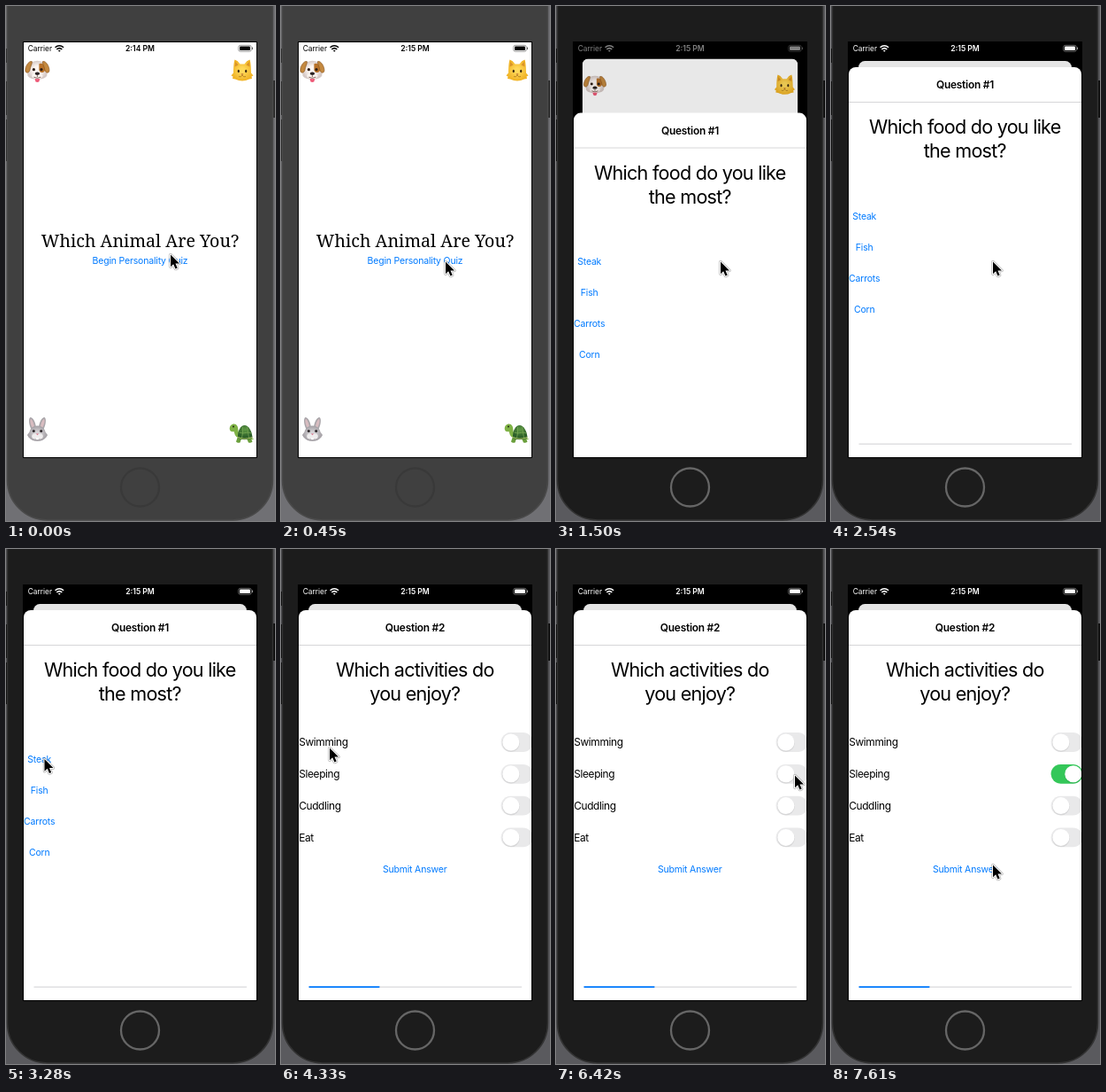
Write an HTML page that moves like this. It is 304x581 px and loops after 8 s.

```html
<!DOCTYPE html>
<html lang="en">
<head>
<meta charset="utf-8">
<title>Personality quiz</title>
<style>
html, body { margin: 0; width: 100%; height: 100%; overflow: hidden; background: #555; }
svg { display: block; width: 304px; height: 581px; }
text { font-family: Inter, Roboto, sans-serif; font-optical-sizing: none; }
.mid { text-anchor: middle; }
.bar { font-size: 8.4px; }
.clock { font-size: 8.6px; font-weight: 600; }
.title { font: 19.7px "Noto Serif", serif; }
.link { font-size: 10.5px; letter-spacing: -.018em; fill: #007aff; }
.head { font-size: 11.9px; font-weight: 600; letter-spacing: -.02em; }
.ask { font-size: 21.6px; letter-spacing: -.035em; }
.row { font-size: 11.9px; letter-spacing: -.03em; }
</style>
</head>
<body>
<svg viewBox="0 0 304 581">
  <defs>
    <clipPath id="screenClip"><rect x="20" y="41" width="263" height="468"/></clipPath>
    <clipPath id="cardClip"><rect id="cardShape" x="20" y="41" width="263" height="468"/></clipPath>
    <radialGradient id="fur"><stop offset=".4" stop-color="#fdf6f2"/><stop offset="1" stop-color="#d5c9c6"/></radialGradient>
    <radialGradient id="gold"><stop offset=".2" stop-color="#ffd95a"/><stop offset="1" stop-color="#f0b224"/></radialGradient>
    <radialGradient id="ash"><stop offset=".2" stop-color="#d6d3d6"/><stop offset="1" stop-color="#a29ea3"/></radialGradient>
    <radialGradient id="shell" cy=".3"><stop offset="0" stop-color="#5f9a45"/><stop offset="1" stop-color="#2d6029"/></radialGradient>
  </defs>

  <g id="device">
    <rect id="outside" width="304" height="581"/>
    <path id="keys" d="M0 48h3v16H0zM0 85h3v38H0zM0 128h3v47H0zM301 84h3v42h-3z"/>
    <rect id="body" x="1.5" y="-80" width="300" height="660" rx="45" stroke-width="1.5"/>
    <circle id="home" cx="151.5" cy="543" r="21.5" fill="none" stroke-width="2.3"/>
  </g>
  <rect x="19" y="40" width="265" height="470"/>

  <g clip-path="url(#screenClip)">
    <g id="card"><g clip-path="url(#cardClip)">
      <rect x="20" y="41" width="263" height="468" fill="#fff"/>

      <g id="dog" transform="translate(35.4 73.2)">
        <path d="M-6-10Q0-13 6-10C10-6 9-1 11 3 12 7 7 9.500 0 9.500S-12 7-11 3C-9-1-10-6-6-10z" fill="url(#fur)"/>
        <path d="M2-8C6-10 9-6 9-2 8 3 3 3 2-1z" fill="#b8722a"/>
        <path d="M-6-10.500C-10-12-14-4-13.500 0-12.500 3.500-9 2-8.500-1-8-5-6-7-6-10.500zM6-10.500C10-12 14-4 13.500 0 12.500 3.500 9 2 8.500-1 8-5 6-7 6-10.500z" fill="#c4893f" stroke="#8c5722" stroke-width=".7"/>
        <path d="M-2.500 8h5v2.500a2.500 2.300 0 0 1-5 0z" fill="#ee5a78"/>
        <ellipse cy="5.500" rx="6" ry="3.600" fill="#fbf5f1"/>
        <circle cx="-4" cy="-1.500" r="1.600" fill="#2c1c14"/><circle cx="4.600" cy="-1.500" r="1.600" fill="#2c1c14"/>
        <ellipse cy="3" rx="2.700" ry="1.800" fill="#2a2222"/>
        <path d="M0 5v2M-4 7Q0 9.300 4 7" fill="none" stroke="#66463c" stroke-width=".8"/>
      </g>

      <g id="cat" transform="translate(267 72.500)">
        <path d="M-10 3C-10-3-9.500-9-8.500-12Q-5-11-2.500-7H2.500Q5-11 8.500-12C9.500-9 10-3 10 3L12.500 6 10.500 7 11 9.500 8 10Q0 14 -8 10L-11 9.500-10.500 7-12.500 6z" fill="url(#gold)"/>
        <path d="M-7.700-9.500-8.500-4-4.500-6zM7.700-9.500 8.500-4 4.500-6z" fill="#d9932a"/>
        <ellipse cx="-4.200" cy="1" rx="1.100" ry="1.700" fill="#372610"/><ellipse cx="4.200" cy="1" rx="1.100" ry="1.700" fill="#372610"/>
        <path d="M-1.500 4h3L0 5.600z" fill="#a8572c"/>
        <path d="M0 5.500q-1.500 3-4 1.500M0 5.500q1.500 3 4 1.500" fill="none" stroke="#a2701a" stroke-width=".7"/>
      </g>

      <g id="rabbit" transform="translate(35.500 477.500)">
        <path d="M-1.500-2C-2-8-5-13.500-8-13.500-10.500-12-9.500-5-7 0zM1.500-2C2-8 5-13.500 8-13.500 10.500-12 9.500-5 7 0z" fill="#aaa6aa"/>
        <path d="M-3.500-3C-4-7-6-11.500-7.500-11.500-9-10-7.500-5-6-2zM3.500-3C4-7 6-11.500 7.500-11.500 9-10 7.500-5 6-2z" fill="#d8bcc0"/>
        <path d="M0-4C5-4 8-1 9 3L11.500 6.500 10 9Q6 13.500 0 13.500T-10 9L-11.500 6.500-9 3C-8-1-5-4 0-4z" fill="url(#ash)"/>
        <ellipse cx="-2.800" cy="8" rx="3.500" ry="2.900" fill="#efedee"/><ellipse cx="2.800" cy="8" rx="3.500" ry="2.900" fill="#efedee"/>
        <circle cx="-4.200" cy="2" r="1.500" fill="#2f292c"/><circle cx="4.200" cy="2" r="1.500" fill="#2f292c"/>
        <path d="M-1.600 5h3.200L0 6.700z" fill="#d9748a"/>
        <path d="M-1.300 9.500h2.600v2.200h-2.600z" fill="#fff"/>
      </g>

      <g id="turtle" transform="translate(266.500 481)">
        <path d="M-4 6C-8 5-8 1-9-1-13 0-14.500-3-13.500-6-12-10-7-11-5-7-3.500-4-5-1-2 2zM9 5 14 8 8 8z" fill="#7fb246"/>
        <path d="M-5 6h5l-2 5.500q-3 1-4.500-1zM5 6h5l2 4.500q-2 2-4.500 1z" fill="#6a9f3c"/>
        <path d="M-4.500 6C-5-2-1-8 3-8 8-8 11.500-1 12 6 8 9-2 9-4.500 6z" fill="url(#shell)"/>
        <path d="M-4.500 5.500Q3 9 12 5.500" fill="none" stroke="#a9bf62" stroke-width="1.200"/>
        <path d="M-3 0 1 1 7 0 11 1M1 1 0 6M7 0 8 6M1 1V-6M7 0 6-6" fill="none" stroke="#7fae58" stroke-width=".7"/>
        <circle cx="-9.500" cy="-6.500" r="1" fill="#1f2a12"/>
      </g>

      <text class="title mid" x="151.500" y="272">Which Animal Are You?</text>
      <text id="begin" class="link mid" x="151.500" y="291">Begin Personality Quiz</text>
      <rect id="dim" x="20" y="41" width="263" height="468"/>
    </g></g>

    <g id="sheet">
      <path d="M20 600V77a8 8 0 0 1 8-8H275a8 8 0 0 1 8 8V600z" fill="#fff"/>
      <path d="M20 108.500H284" stroke="#d2d2d4" stroke-width=".9"/>
      <text id="head" class="head mid" x="151.500" y="93"></text>
      <text id="ask1" class="ask mid" x="151.300" y="144.300"></text>
      <text id="ask2" class="ask mid" x="151.300" y="171"></text>
      <g id="foods"></g>
      <g id="acts"><text class="link mid" x="151.200" y="364.500">Submit Answer</text></g>
      <rect x="31.300" y="493.400" width="241" height="1.400" rx=".7" fill="#d9d9dc"/>
      <rect id="fill" x="31.300" y="493.200" height="1.700" rx=".8" fill="#007aff"/>
    </g>

    <g id="status">
      <text class="bar" x="24.700" y="51">Carrier</text>
      <text id="clock" class="bar clock mid" x="151.500" y="51"></text>
      <g fill="none" stroke="currentColor" stroke-width="1.500">
        <path d="M55.500 46.800Q60.300 42.600 65.100 46.800M57.300 48.900Q60.300 46.300 63.300 48.900"/>
        <path d="M60.300 51.800 58.900 50.300Q60.300 49.300 61.700 50.300z" fill="currentColor" stroke="none"/>
        <rect x="262.700" y="44.300" width="14.600" height="7" rx="2.200" stroke-width=".7" stroke-opacity=".55"/>
        <rect x="264" y="45.500" width="12" height="4.600" rx="1.100" fill="currentColor" stroke="none"/>
        <path d="M278.500 46.500v2.600" stroke-width="1" stroke-opacity=".6"/>
      </g>
    </g>
  </g>

  <g id="cursor" stroke-linejoin="round">
    <path id="arrow" d="M0 .5V14.300L3.200 11.300 5.500 16.600 7.700 15.600 5.500 10.500H10z" fill="none" stroke="#000" stroke-opacity=".3" stroke-width="3.400"/>
    <use href="#arrow" visibility="hidden"/>
    <path d="M0 .5V14.300L3.200 11.300 5.500 16.600 7.700 15.600 5.500 10.500H10z" stroke="#fff" stroke-width="2" paint-order="stroke"/>
  </g>
</svg>
<script>
const LOOP = 8000, STEP = 149.2;
const $ = id => document.getElementById(id);
const clamp = v => Math.max(0, Math.min(1, v));
const mix = (a, b, p) => a + (b - a) * p;

function set(id, attrs) {
  for (const name in attrs) $(id).setAttribute(name, attrs[name]);
}

// Value at step k from [step, ...values] keys.
function track(keys, k) {
  let i = 0;
  while (i < keys.length - 1 && keys[i + 1][0] <= k) i++;
  const a = keys[i], b = keys[i + 1] || a;
  const p = b === a ? 0 : clamp((k - a[0]) / (b[0] - a[0]));
  return a.slice(1).map((v, j) => mix(v, b[j + 1], p));
}

const pointer = [
  [0, 186, 280], [2, 186, 280], [3, 186, 288], [16, 186, 288], [17, 183, 288],
  [18, 154, 283], [19, 106, 264], [20, 70, 249], [21, 50, 240], [22, 43.5, 236.5],
  [27, 43.5, 236.5], [28, 47, 230], [29, 55, 224], [30, 66, 236], [31, 65, 250],
  [32, 61.5, 256], [33, 61.5, 256], [34, 62.5, 257], [38, 62.5, 257],
  [39, 72, 262], [40, 108, 269], [41, 176, 269], [42, 238, 262], [43, 270, 255],
  [46, 270, 255], [47, 261, 268], [48, 232, 306], [49, 203, 340], [50, 187, 353], [51, 183, 356]
];
const switchOn = [[0, 0], [44, 0], [45, .3], [46, .95], [47, 1]];
const progress = [[23, 0], [24, .08], [25, .25], [26, 1 / 3]];
const asks = [["Which food do you like", "the most?"], ["Which activities do", "you enjoy?"]];

$("foods").innerHTML = ["Steak", "Fish", "Carrots", "Corn"].map((name, i) =>
  `<text class="link mid" x="37.700" y="${240.6 + i * 35}">${name}</text>`).join("");

$("acts").innerHTML += ["Swimming", "Sleeping", "Cuddling", "Eat"].map((name, i) => {
  const y = 218 + i * 35.8;
  return `<text class="row" x="20.200" y="${y + 4.2}">${name}</text>
    <rect id="track${i}" x="248.600" y="${y - 10.9}" width="35.800" height="21.800" rx="10.900" fill="#e9e9ea"/>
    <circle id="shade${i}" cx="259.900" cy="${y + 1}" r="9.900" opacity=".08"/>
    <circle id="thumb${i}" cx="259.900" cy="${y}" r="9.500" fill="#fff"/>`;
}).join("");

function draw(time) {
  const k = Math.floor((time + 6) / STEP), t = k * STEP;
  const active = k >= 8, second = k >= 24;

  set("outside", { fill: active ? "#5a5a5e" : "#707074" });
  set("keys", { fill: active ? "#0c0c0c" : "#2b2b2b" });
  set("body", { fill: active ? "#1c1c1c" : "#404040", stroke: active ? "#333" : "#4a4a4a" });
  set("home", { stroke: active ? "#666" : "#393939" });

  // Critically damped rise of the sheet.
  const w = Math.max(0, t - 1287) * .018;
  const rise = 1 - (1 + w) * Math.exp(-w);
  const size = 1 - .084 * rise;
  set("sheet", { transform: `translate(0 ${440 * (1 - rise)})`, visibility: rise > 0 ? "visible" : "hidden" });
  set("card", { transform: `translate(151.5 ${41 + 21 * rise}) scale(${size}) translate(-151.5 -41)` });
  set("cardShape", { rx: 8 * rise });
  set("dim", { opacity: .1 * rise });
  set("begin", { opacity: active ? .2 : 1 });

  const light = Math.round(255 * clamp((k - 9) / 2));
  const ink = `rgb(${light},${light},${light})`;
  set("status", { fill: ink, color: ink });
  $("clock").textContent = k < 1 ? "2:14 PM" : "2:15 PM";

  const page = second ? 1 : 0;
  $("head").textContent = "Question #" + (page + 1);
  $("ask1").textContent = asks[page][0];
  $("ask2").textContent = asks[page][1];
  $("foods").style.display = second ? "none" : "";
  $("acts").style.display = second ? "" : "none";
  set("fill", { width: 241 * track(progress, k)[0] });

  const on = track(switchOn, k)[0];
  const green = [[233, 52], [233, 199], [234, 89]].map(c => Math.round(mix(...c, on)));
  set("track1", { fill: `rgb(${green})` });
  for (const part of ["thumb1", "shade1"]) set(part, { cx: 259.9 + 13.9 * on });

  set("cursor", { transform: `translate(${track(pointer, k)})` });
}

const start = performance.now();
function tick(now) {
  draw(Math.max(0, now - start) % LOOP);
  requestAnimationFrame(tick);
}
draw(0);
requestAnimationFrame(tick);
</script>
</body>
</html>
```
